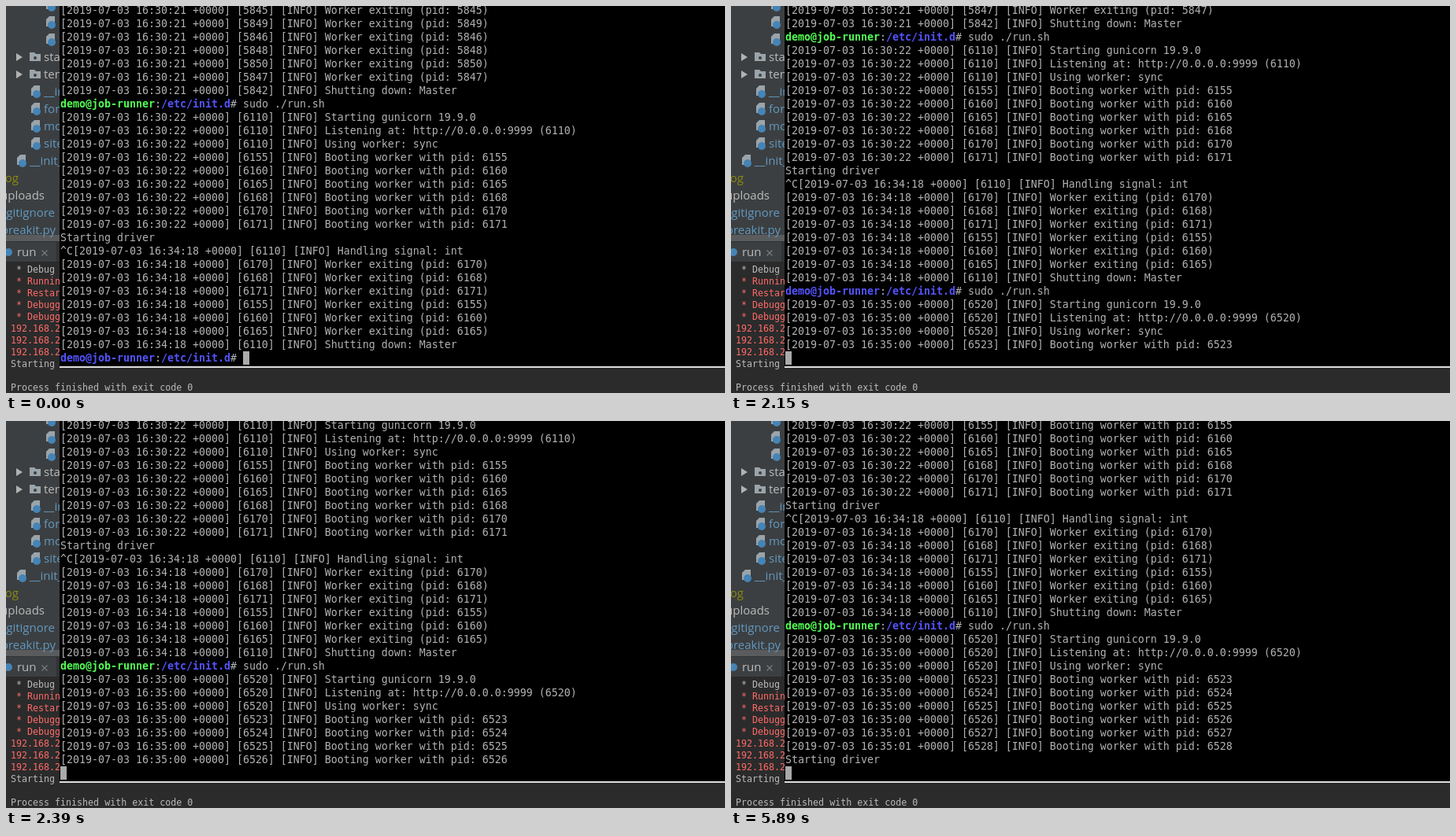
An HTML page that plays this animation: 913 by 492 pixels, repeating every 8000 ms.

```html
<!DOCTYPE html>
<html lang="en">
<head>
<meta charset="utf-8">
<title>Terminal restart</title>
<style>
  html, body { margin: 0; width: 100%; height: 100%; overflow: hidden; background: #2b2b2b; }
  #stage { position: relative; width: 913px; height: 492px; overflow: hidden; }
  svg { position: absolute; left: 0; top: 0; }
  svg text { white-space: pre; }
  .tree { font: 15px "Open Sans", sans-serif; }
  .console { font: 11.65px "DejaVu Sans Mono", monospace; }
  #terminal { position: absolute; left: 68px; top: 0; width: 845px; height: 458px; background: #000; overflow: hidden; }
  #screen { position: absolute; left: 1px; top: -3px; margin: 0; color: #b2b2b2;
    font: 13.29px/17px "DejaVu Sans Mono", monospace; }
  #screen b { color: #54ff54; }
  #screen b + b { color: #5454ff; }
  #cursor { position: absolute; top: 439px; width: 8px; height: 17px; background: #aaa; }
  #edge { position: absolute; left: 68px; top: 458px; width: 845px; height: 2px; background: #dedede; }
  #pointer { position: absolute; left: 842px; top: 41px; width: 3px; height: 12px;
    border: solid #ddd; border-width: 1px 0; }
</style>
</head>
<body>
<div id="stage">
  <svg id="ide" width="913" height="492"></svg>
  <div id="terminal">
    <pre id="screen"></pre>
    <div id="cursor"></div>
    <div id="pointer"></div>
  </div>
  <div id="edge"></div>
</div>
<script>
const $ = id => document.getElementById(id);

// Left-hand project tree and run console
const label = (x, y, text, fill, cls, anchor = 'start') =>
  `<text x="${x}" y="${y}" fill="${fill}" class="${cls}" text-anchor="${anchor}">${text}</text>`;
const box = (x, y, w, h, fill) =>
  `<rect x="${x}" y="${y}" width="${w}" height="${h}" fill="${fill}"/>`;
const dot = (x, y, r, fill) => `<circle cx="${x}" cy="${y}" r="${r}" fill="${fill}"/>`;
const fileIcon = (x, y) =>
  `<path d="M${x + 5} ${y - 8}h7v13h-11v-9z" fill="#9aa4aa"/>` + dot(x + 8, y + 3, 5, '#4584b6');
const folder = y =>
  `<path d="M13 ${y - 5}l8 5l-8 5z" fill="#b0b2b3"/>` +
  `<path d="M30 ${y - 6}h6l2 2h6v9h-14z" fill="#9aa4aa"/>` + dot(37, y + 1, 2, '#3c3f41');

const grey = '#bbbbbb', blue = '#6299c0', red = '#ff6b68';
const ide = [box(0, 0, 68, 326, '#3c3f41'), box(0, 291, 68, 8, '#595b5d'),
  box(0, 299, 68, 1, '#323232'), box(64, 300, 4, 26, '#303234'), box(0, 325, 68, 1, '#292929')];

[-1, 21, 43].forEach(y => ide.push(fileIcon(50, y)));
['static', 'templates'].forEach((name, i) => {
  const y = 65 + 22 * i;
  ide.push(folder(y), label(48, y + 5, name, grey, 'tree'));
});
['__init__.py', 'forms.py', 'models.py', 'site.py'].forEach((name, i) => {
  const y = 109 + 22 * i;
  ide.push(fileIcon(31, y), label(48, y + 5, name, blue, 'tree'));
});
ide.push(fileIcon(13, 197), label(30, 202, '__init__.py', blue, 'tree'));
[['log', 16, '#8c8a10'], ['uploads', 49, grey], ['.gitignore', 62, blue], ['breakit.py', 63, blue]]
  .forEach(([name, right, fill], i) => ide.push(label(right, 224 + 22 * i, name, fill, 'tree', 'end')));

ide.push(dot(3, 313, 5, '#4584b6'), label(14, 318, 'run', grey, 'tree'),
  '<path d="M45.5 310.5l7 7m0-7l-7 7" stroke="#777a7c" stroke-width="1.3"/>');
[' * Debug mode', ' * Running', ' * Restarting', ' * Debugger', ' * Debugger',
  '192.168.2', '192.168.2', '192.168.2', 'Starting driver', '', 'Process finished with exit code 0']
  .forEach((text, i) => ide.push(label(6, 339 + 15 * i, text, i > 0 && i < 8 ? red : grey, 'console')));
$('ide').innerHTML = ide.join('');

// Terminal session
const prompt = '<b>demo@job-runner</b>:<b>/etc/init.d</b># ';
const promptLength = 29;
const command = 'sudo ./run.sh';
const log = (time, pid, message) => `[2019-07-03 ${time} +0000] [${pid}] [INFO] ${message}`;
const boot = (time, pid) => log(time, pid, `Booting worker with pid: ${pid}`);
const start = (time, pid) => ['Starting gunicorn 19.9.0',
  `Listening at: http://0.0.0.0:9999 (${pid})`, 'Using worker: sync'].map(m => log(time, pid, m));
const stop = (time, master, pids) => [
  ...pids.map(pid => log(time, pid, `Worker exiting (pid: ${pid})`)),
  log(time, master, 'Shutting down: Master')];

const lines = [
  ...stop('16:30:21', 5842, [5845, 5849, 5846, 5848, 5850, 5847]),
  prompt + command,
  ...start('16:30:22', 6110),
  ...[6155, 6160, 6165, 6168, 6170, 6171].map(pid => boot('16:30:22', pid)),
  'Starting driver',
  '^C' + log('16:34:18', 6110, 'Handling signal: int'),
  ...stop('16:34:18', 6110, [6170, 6168, 6171, 6155, 6160, 6165]),
  prompt + command,
  ...start('16:35:00', 6520),
  ...[6523, 6524, 6525, 6526, 6527, 6528].map(pid => boot(pid < 6527 ? '16:35:00' : '16:35:01', pid)),
  'Starting driver'
];

// [start time, finished lines, current input line, cursor column]
const steps = [
  [0, 26, prompt, promptLength],
  [980, 26, prompt + command, promptLength + command.length],
  ...[[1990, 27], [2150, 31], [2240, 32], [2310, 33], [2390, 34], [2470, 36], [5200, 37]]
    .map(([time, count]) => [time, count, '', 0])
];
const rowsAbove = 26;
let shown;

function draw() {
  const t = performance.now() % 8000;
  const step = steps.findLast(([time]) => time <= t);
  if (step !== shown) {
    const [, count, input, column] = shown = step;
    $('screen').innerHTML = [...lines.slice(count - rowsAbove, count), input].join('\n');
    $('cursor').style.left = 1 + 8 * column + 'px';
  }
  $('pointer').style.visibility = t >= 5420 && t < 5730 ? 'visible' : 'hidden';
  requestAnimationFrame(draw);
}
draw();
</script>
</body>
</html>
```
